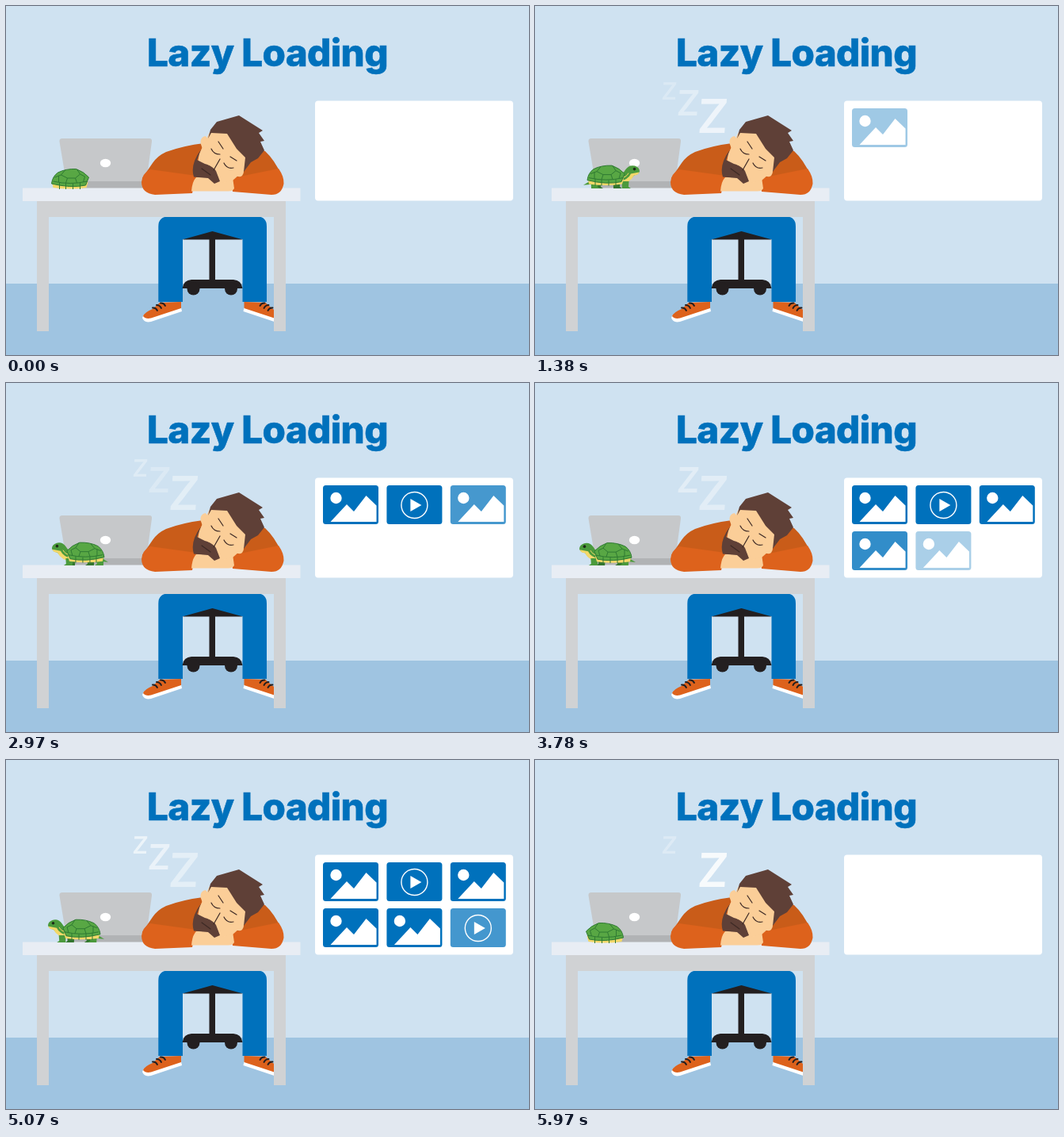
Animation, 660 px wide and 440 px high, one loop 6 s. Source, as an HTML page:

```html
<!DOCTYPE html>
<html lang="en">
<head>
<meta charset="utf-8">
<title>Lazy Loading</title>
<style>
  html, body { margin: 0; width: 100%; height: 100%; overflow: hidden; background: #cfe2f1; }
  svg { display: block; width: 660px; height: 440px; }
  text { font-family: Inter, "Open Sans", sans-serif; }
  .title { font-size: 47.5px; font-weight: 800; letter-spacing: -.6px; fill: #0071bc; stroke: #0071bc; stroke-width: .6; }
  .z { font-weight: 600; fill: #fff; }
  .line { fill: none; stroke: #3d2925; stroke-width: 1.2; stroke-linecap: round; }
  .skin { fill: #fbce98; }
  .hair { fill: #5f4037; }
  .ink { fill: #231f20; }
  .frame { fill: #d0d2d4; }
</style>
</head>
<body>
<svg viewBox="0 0 660 440" xmlns="http://www.w3.org/2000/svg">
  <defs>
    <g id="shoe">
      <path fill="#fff" d="M221 380 L222 385 L183 398 Q174 400 172 393 L174 389Z"/>
      <path fill="#dd621c" d="M194 374 L221 373 L221 381 L183 393.500 Q176 395 173 391 Q175 386 185 382Z"/>
      <path fill="none" stroke="#231f20" stroke-width="1.900" stroke-linecap="round" d="M185 380.500 Q189 380 191 384 M190 377 Q194 377 196 381 M195 374.500 Q199 374 201 378"/>
    </g>
    <rect id="card" width="70" height="49" rx="3.5" fill="#0071bc"/>
    <g id="picture" fill="#fff">
      <use href="#card"/>
      <circle cx="16.5" cy="16" r="7.2"/>
      <path d="M9.5 46 L30 24 L39 33 L54.5 13 L67.5 25.5 V46Z"/>
    </g>
    <g id="video">
      <use href="#card"/>
      <circle cx="35" cy="25" r="16.5" fill="none" stroke="#fff" stroke-width="1.4"/>
      <path fill="#fff" d="M30 17 L44 25 L30 33Z"/>
    </g>
    <path id="leg" d="M-4.5 -9 H4.5 L4 -2 L7 0 H-4Z"/>
  </defs>

  <rect width="660" height="440" fill="#cfe2f1"/>
  <rect y="350" width="660" height="90" fill="#9fc4e1"/>
  <text class="title" x="330" y="76" text-anchor="middle">Lazy Loading</text>

  <rect x="390" y="119.500" width="250" height="126" rx="4" fill="#fff"/>
  <g id="cards"></g>

  <!-- chair and legs -->
  <path fill="#0071bc" d="M192.300 373 V278 Q192.300 265.500 205 265.500 H317 Q329 265.500 329 278 V373 H298.500 V294 H223 V373Z"/>
  <g class="ink">
    <path d="M222.500 294.500 L260.500 284 L299 294.500Z"/>
    <rect x="256.500" y="288" width="7.500" height="60"/>
    <path d="M222.500 356 Q224 345.500 234 345 H287 Q297 345.500 298.500 356Z"/>
    <circle cx="236.500" cy="356.500" r="8"/>
    <circle cx="284" cy="356.500" r="8"/>
  </g>
  <use href="#shoe"/>
  <use href="#shoe" transform="matrix(-1 0 0 1 521.500 0)"/>

  <!-- laptop -->
  <path fill="#c6c8ca" d="M71 167 H181 Q184.500 167 184 171 L177 222 H76 L67.500 171 Q67 167 71 167Z"/>
  <rect x="77" y="221" width="100" height="9" fill="#b1b3b5"/>
  <ellipse cx="125.500" cy="198" rx="6.700" ry="5.300" fill="#fff"/>

  <!-- desk -->
  <path class="frame" d="M39 246 H353 V410 H338 V266 H54 V410 H39Z"/>
  <rect x="21" y="229.500" width="350.500" height="16.500" fill="#e8edf4"/>

  <!-- sleeper -->
  <path fill="#c95c19" d="M172 217 L185 198 Q191 189 202 184 Q224 176 250 173 L318 180 L327 183 Q339 194 348 214 L300 232 H190Z"/>
  <path fill="#dd621c" d="M171 222 Q172 211 182 206 L240 214 L235 236 L188 238 Q171 236 171 222Z"/>
  <path fill="#dd621c" d="M285 217 L344 205 Q351 215 350.500 224 Q348 238 335 238 L286 234Z"/>
  <path class="skin" d="M240 216 H286 L288 230 Q286 233.500 281 233.500 H234 Q235 221 240 216Z"/>
  <path class="skin" d="M252 164 Q245 165 245.500 173 L249 183 L257 172Z M298 203 Q302 209 298 214 Q294 217 289 213Z"/>
  <path class="skin" d="M257 159 L285 160 L312 190 L302 206 L286 220 L268 224 L240 208 L244 186Z"/>
  <path class="hair" d="M255 167 L258 156 L266 146 L294 138 L324 157 L319 160 L326 170 L321 171 L326 182 L318 192 L309 197 L300 209 L302 191 L291 180 L279 161 L259 160Z"/>
  <path class="hair" d="M246 181 L241 194 L251 199 Q261 202 265 208 L270 221 L263 224 L255 217 L237 215.500 Q232 200 246 181Z"/>
  <path class="line" d="M268 171 L274 180 M283 190 L291 195 M259 180 Q262 187 270 187 M275 198 Q279 206 287 204 M270 193 L262 207"/>
  <path class="line" stroke-width="2" d="M247 205 L258 213"/>

  <g id="snore"></g>

  <g id="turtle">
    <g id="farLegs" fill="#33762f"><use href="#leg"/><use href="#leg"/></g>
    <path id="tail" fill="#4b9a3c" d="M-19 -8 L-29 -2 L-18 -3Z"/>
    <g id="head">
      <path fill="#4b9a3c" d="M14 -14 Q21 -13 24 -19 Q29 -26 36 -24 Q42 -22 42 -17 Q41 -13 35 -12 Q30 -5 22 -2 L13 -2Z"/>
      <path fill="#f3d869" d="M41.500 -16 Q36 -15 31 -14 Q28 -7 16 -4 L17 -1 Q30 -2 35 -12 Q40 -12 41.500 -16Z"/>
      <path fill="none" stroke="#f3d869" d="M28 -15 Q25 -9 18 -9"/>
      <circle cx="35.500" cy="-20" r="1.800" fill="#1d2b18"/>
    </g>
    <g id="nearLegs" fill="#4b9a3c"><use href="#leg"/><use href="#leg"/></g>
    <g id="shell">
      <path fill="#f3d869" d="M-23 -6 L-22 -1 Q0 2 20 -1 L22 -8Z"/>
      <path fill="#58a744" stroke="#2f7a33" d="M-24 -6 Q-23 -15 -16 -20 Q-6 -25 7 -24.500 Q17 -21 23 -14 L19 -4 Q0 0 -24 -6Z"/>
      <path fill="none" stroke="#2f7a33" d="M-22 -9 Q0 -4 21 -9 M-20 -14 L-12 -17 L-4 -13 L6 -13 L12 -18 L18 -15 M-12 -17 L-7 -23 M12 -18 L8 -24 M-4 -13 L-6 -7 M6 -13 L8 -7 M-15 -16 L-15 -8 M18 -15 L16 -8 M-14 -8 V1 M-6 -7 V1 M3 -6 V1 M12 -7 V1"/>
    </g>
  </g>
</svg>

<script>
const LOOP = 6000;
const $ = id => document.getElementById(id);
const clamp = v => Math.max(0, Math.min(1, v));
const ramp = (t, start, length) => clamp((t - start) / length);

// Linear interpolation through [time, value] steps.
function along(steps, t) {
  const i = steps.findIndex(s => s[0] > t);
  if (i < 0) return steps[steps.length - 1][1];
  if (i === 0) return steps[0][1];
  const [t0, a] = steps[i - 1], [t1, b] = steps[i];
  return a + (b - a) * (t - t0) / (t1 - t0);
}

function add(parent, tag, attrs, text = "") {
  const el = document.createElementNS("http://www.w3.org/2000/svg", tag);
  for (const k in attrs) el.setAttribute(k, attrs[k]);
  el.textContent = text;
  return parent.appendChild(el);
}

const cards = [1010, 1660, 2250, 2980, 3450, 4340].map((start, i) => ({
  start,
  el: add($("cards"), "use", {
    href: i === 1 || i === 5 ? "#video" : "#picture",
    x: 400 + (i % 3) * 80.4,
    y: i < 3 ? 129 : 187
  })
}));

const snores = [
  { x: 159, y: 117.5, size: 30, steps: [[0, 0], [1100, 0], [1380, .25], [2310, .72], [3500, 0], [3780, 0], [5070, .62], [5520, .72], [5970, .3]] },
  { x: 178, y: 137.5, size: 44, steps: [[0, 0], [800, 0], [1380, .38], [2310, .15], [3780, .4], [5070, .58], [5520, .3], [5940, 0]] },
  { x: 204, y: 159.5, size: 59, steps: [[0, 0], [400, 0], [1380, .65], [2310, .42], [3780, .4], [5070, .45], [5520, .72], [5970, .85]] }
].map(z => ({
  ...z,
  el: add($("snore"), "text", {
    class: "z", "font-size": z.size,
    transform: `translate(${z.x} ${z.y}) skewX(-4)`
  }, "Z")
}));

const TURN = 2940;
const walk = [[0, 81.5], [660, 83], [1380, 90], [2310, 98], [TURN, 100], [3780, 98], [4410, 96], [5070, 95], [5520, 93], [5970, 87.5]];

function place(el, x, y, sx = 1, sy = sx) {
  el.setAttribute("transform", `translate(${x} ${y}) scale(${sx} ${sy})`);
}

function drawTurtle(t) {
  const out = Math.min(ramp(t, 60, 480), 1 - ramp(t, 5700, 240));
  const phase = t / 620 * Math.PI * 2;
  const swing = Math.sin(phase) * 2 * out;
  const lift = -4 * out + Math.cos(phase * 2) * .4 * out;
  place($("turtle"), along(walk, t), 230, t < TURN ? 1 : -1, 1);
  place($("shell"), 0, lift);
  place($("head"), -6 * (1 - out), lift, .4 + .6 * out);
  place($("tail"), 0, lift * .5, .6 + .4 * out);
  const [farBack, farFront] = $("farLegs").children;
  const [back, front] = $("nearLegs").children;
  place(farBack, -9 - swing, 0, 1, out);
  place(farFront, 15 - swing, 0, 1, out);
  place(back, -17 + swing, 0, 1, out);
  place(front, 22 * (.7 + .3 * out) + swing, 0, 1, out);
}

function draw(now) {
  const t = now % LOOP;
  for (const c of cards) c.el.setAttribute("opacity", ramp(t, c.start, 1000));
  $("cards").setAttribute("opacity", 1 - ramp(t, 5345, 500));
  for (const z of snores) z.el.setAttribute("opacity", along(z.steps, t));
  drawTurtle(t);
}

const begin = performance.now();
function tick() {
  draw(performance.now() - begin);
  requestAnimationFrame(tick);
}
tick();
</script>
</body>
</html>
```
